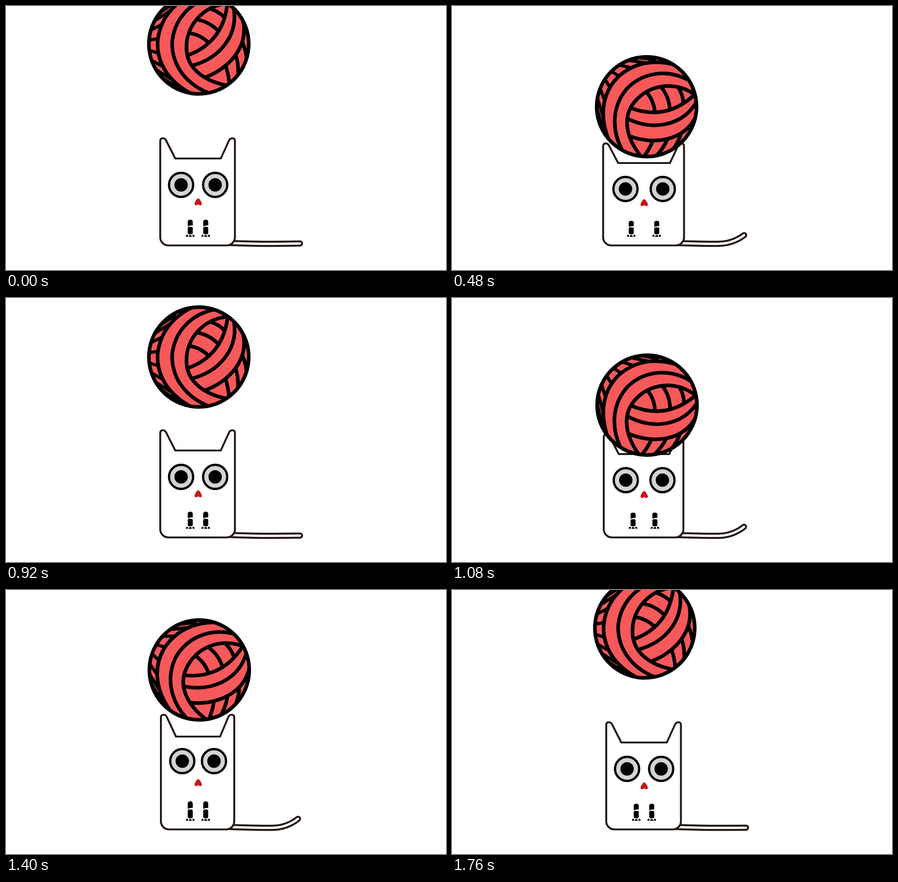
Recreate the animation shown at these times as an HTML page. Size 966 by 580 pixels, loop 1.8 s.

```html
<!DOCTYPE html>
<html lang="en">
<head>
<meta charset="utf-8">
<title>Cat and ball</title>
<style>
  html, body { margin: 0; width: 100%; height: 100%; overflow: hidden; background: #fff; }
  svg { display: block; width: 966px; height: 580px; }
  .body { fill: #fff; stroke: #231815; stroke-width: 4.2; stroke-linejoin: round; }
  .tail { fill: none; stroke: #231815; stroke-width: 13.5; stroke-linecap: round; }
  .tail.inner { stroke: #fff; stroke-width: 5; }
  .yarn { fill: none; stroke: #000; stroke-width: 8; }
  .red { fill: #f7595b; stroke: none; }
  .eye { fill: #d3d3d3; stroke: #000; stroke-width: 5; }
</style>
</head>
<body>
<svg viewBox="0 0 966 580">
  <defs>
    <clipPath id="disc"><circle cx="428" cy="217" r="110"/></clipPath>
    <path id="tail"/>
    <g id="eye"><circle class="eye" r="26.5"/><circle r="14.7"/></g>
    <g id="shin">
      <path d="M-5.5-18V-27Q-5.5-31.5 0-31.5T5.5-27V-19Q0-19.5-5.5-17Z"/>
      <rect x="-5.5" y="-16" width="11" height="16.5" rx="3.5"/>
    </g>
    <path id="paw" d="M-9.5 6Q-9-.5-4.5 2.5L-5.5 6ZM-3.5 6Q-3 2 0 2T3.5 6ZM9.5 6Q9-.5 4.5 2.5L5.5 6Z"/>
  </defs>

  <use class="tail" href="#tail"/>
  <use class="tail inner" href="#tail"/>
  <path id="body" class="body"/>
  <use id="eyeL" href="#eye"/>
  <use id="eyeR" href="#eye"/>
  <path id="nose" fill="#c7161d" d="M0-8C3-8 8 1 8 4C8 8 3 8.5 0 5C-3 8.5-8 8-8 4C-8 1-3-8 0-8Z"/>
  <g id="legL"><use href="#shin"/><use href="#paw"/></g>
  <g id="legR"><use href="#shin"/><use href="#paw"/></g>

  <g id="ball">
    <g transform="translate(-428 -217)">
      <circle class="red" cx="428" cy="217" r="110"/>
      <g class="yarn" clip-path="url(#disc)">
        <path id="ticks" stroke-width="7"/>
        <path class="red" d="M345 292C322 235 332 185 365 152C400 120 445 112 495 127H560V340H345Z"/>
        <path d="M345 292C322 235 332 185 365 152C400 120 445 112 495 127"/>
        <path d="M372 310C350 265 352 215 385 177C420 142 475 132 526 163"/>
        <path d="M414 326C382 285 374 240 400 208C432 168 490 160 534 192"/>
        <path d="M392 219Q470 250 534 192M386 243C440 270 505 262 538 208M387 280C440 302 510 295 537 238"/>
        <path d="M429 186Q444 204 446 229M461 175Q478 196 479 225M497 174Q508 190 509 211"/>
        <path d="M440 293Q433 310 420 327M473 288Q464 309 446 327M503 275Q498 295 482 315"/>
      </g>
      <circle class="yarn" cx="428" cy="217" r="109.6"/>
    </g>
  </g>
</svg>
<script>
const LOOP = 1800, STEP = 40;
const TOP = 83.5, PEAK = 128.5, LOW = 237;
const $ = id => document.getElementById(id);
const lerp = (a, b, k) => a + (b - a) * k;
const span = (t, from, to) => Math.min(1, Math.max(0, (t - from) / (to - from)));
const wave = s => (1 - Math.cos(Math.PI * s)) / 2;
const place = (id, x, y, more = '') => $(id).setAttribute('transform', `translate(${x} ${y}) ${more}`);

// Short yarn ends along the rim, leaning over as they go round
function drawTicks() {
  const rad = Math.PI / 180;
  let d = '';
  for (let a = 178; a < 270; a += 12) {
    const lean = (41 - 33 * Math.tanh((a - 222) / 14)) * rad;
    d += `M${428 + 109 * Math.cos(a * rad)} ${217 + 109 * Math.sin(a * rad)}`
       + `l${38 * Math.cos(lean)} ${38 * Math.sin(lean)}`;
  }
  $('ticks').setAttribute('d', d);
}

function ballHeight(t) {
  if (t < 364) return lerp(TOP, LOW, wave(span(t, 0, 364)));
  if (t < 908) return lerp(LOW, PEAK, wave(span(t, 364, 908) ** 0.9));
  if (t < 1095) return lerp(PEAK, LOW, wave(span(t, 908, 1095)));
  return lerp(LOW, TOP, wave(span(t, 1122, 1760)));
}

function drawBall(t) {
  const y = ballHeight(t);
  const top = t > 364 && t < 1095 ? PEAK : TOP;
  const depth = (y - top) / (LOW - top);
  const turn = Math.min(1, depth + 0.38 * Math.max(0, depth - 0.65));
  place('ball', 423.3 + 4.9 * turn ** 3, y, `rotate(${lerp(-41.5, 2, turn)})`);
}

// Squash (positive), then stretch (negative) after each hit
const spring = (t, from, to) => Math.sin(2 * Math.PI * span(t, from, to) ** 1.4);

function drawCat(t) {
  const q = spring(t, 280, 720) + spring(t, 960, 1500);
  const down = Math.max(0, q), up = Math.max(0, -q);
  const head = 335 + 11.5 * down - 13 * up;
  const ear = 290.5 + 13 * down - 16.5 * up;
  const half = 82 + 7.8 * down - 1.5 * up;
  const l = 420.6 - half, r = 420.6 + half;
  $('body').setAttribute('d',
    `M${l} 508V${ear + 6}Q${l} ${ear} ${l + 6} ${ear}Q${l + 10.5} ${ear} ${l + 13} ${ear + 5}` +
    `L${l + 33} ${head}H${r - 31}L${r - 13} ${ear + 5}Q${r - 10.5} ${ear} ${r - 6} ${ear}` +
    `Q${r} ${ear} ${r} ${ear + 6}V508a18 18 0 0 1-18 18H${l + 18}a18 18 0 0 1-18-18Z`);

  place('nose', 422, 430.5 + 2 * down - 7 * up);
  for (const [end, side] of [['L', -1], ['R', 1]]) {
    place('eye' + end, 421.8 + side * (37.4 + 4.1 * down - 2.6 * up), 393 + 10.3 * down - 17 * up);
    place('leg' + end, 421.5 + side * (17 + 14.5 * down ** 2), 501);
    $('leg' + end).firstChild.setAttribute('transform', `scale(1 ${1 - 0.09 * down + 0.17 * up})`);
  }
}

// The tail tip curls up along an arc of fixed length
function drawTail(t) {
  const swing = mid => wave(1 - span(Math.abs(t - mid), 0, 345));
  const bend = Math.max(0.01, 1.2 * (swing(315) + swing(1240)));
  const radius = 61.5 / bend;
  $('tail').setAttribute('d', `M490 520.5Q540 522.5 584 522.5` +
    `a${radius} ${radius} 0 0 0 ${radius * Math.sin(bend)} ${-radius * (1 - Math.cos(bend))}`);
}

drawTicks();
const start = performance.now();
function frame() {
  const now = Math.max(0, performance.now() - start) % LOOP;
  const t = Math.floor(now / STEP) * STEP;
  drawBall(t);
  drawCat(t);
  drawTail(t);
  requestAnimationFrame(frame);
}
frame();
</script>
</body>
</html>
```
